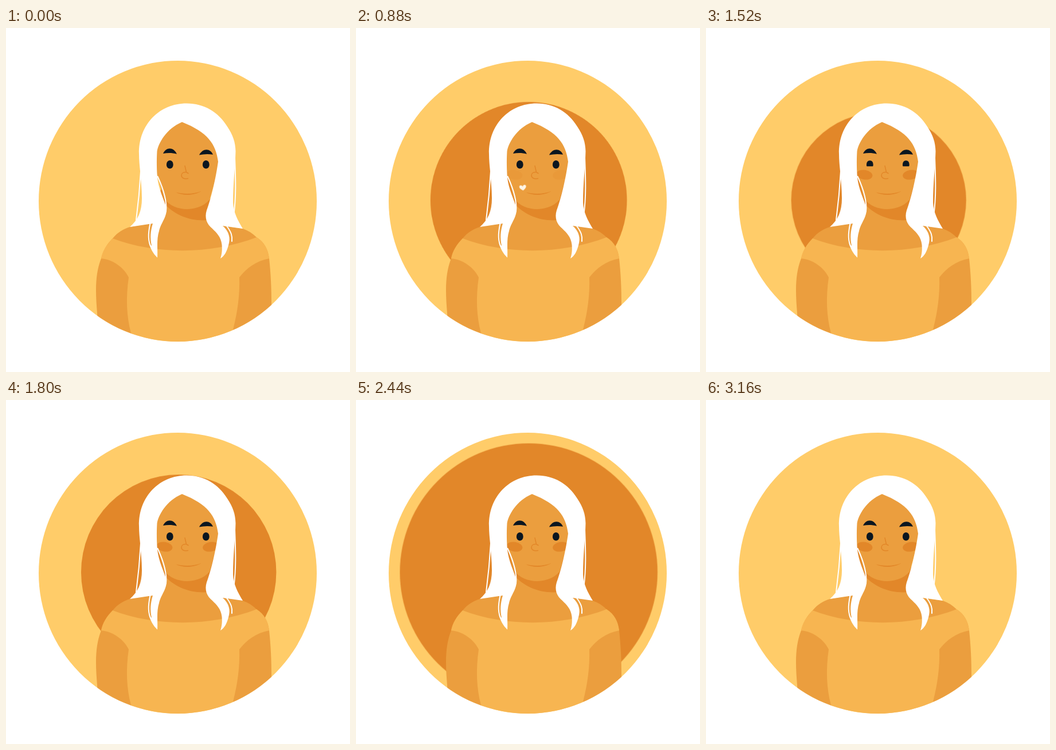
An HTML page that plays this animation: 600x600 px, repeating every 3.4 s.

```html
<!DOCTYPE html>
<html lang="en">
<head>
<meta charset="utf-8">
<title>Portrait with pulsing disc</title>
<style>
  html, body { margin: 0; width: 100%; height: 100%; overflow: hidden; background: #fff; }
  svg { display: block; width: 100vw; height: 100vh; }

  .skin { fill: #eb9e3e; }
  .shade { fill: #e28729; }
  .shirt { fill: #f7b551; }
  .ink { fill: #0b1620; }
  .hair { fill: #fff; }
  .strand { fill: none; stroke: #fff; stroke-width: 2; stroke-linecap: round; }
  .line { fill: none; stroke: #e28729; stroke-width: 1.5; stroke-linecap: round; stroke-linejoin: round; }

  .disc, .blush, .eye, .heart { animation: 3400ms linear infinite; }
  .disc { animation-name: pulse; animation-timing-function: cubic-bezier(.333, 0, .667, 1); }
  .blush { animation-name: blush; }
  .eye { animation-name: squint; }
  .heart { animation-name: kiss; }

  @keyframes pulse {
    0% { transform: scale(.18); }
    35.294% { transform: scale(1); }
    44.706% { transform: scale(.763); }
    70.588% { transform: scale(1.1285); }
    98.824%, 100% { transform: scale(.18); }
  }
  @keyframes blush {
    0%, 23.529% { opacity: 0; }
    35.294%, 100% { opacity: 1; }
  }
  @keyframes squint {
    0%, 42.353% { clip-path: inset(0 0 0 0); }
    44.706% { clip-path: inset(3% 0 28% 0); }
    45.882% { clip-path: inset(5% 0 42% 0); }
    49.412%, 100% { clip-path: inset(0 0 0 0); }
  }
  @keyframes kiss {
    0%, 3.529% { transform: translate(303px, 288px) scale(0); opacity: 1; }
    25.882% { transform: translate(291px, 278.5px) scale(1); opacity: .95; }
    32.353%, 100% { transform: translate(287px, 275px) scale(1); opacity: 0; }
  }
</style>
</head>
<body>
<svg viewBox="0 0 600 600">
  <defs>
    <clipPath id="frame"><ellipse cx="299.5" cy="302" rx="242.5" ry="245"/></clipPath>
  </defs>

  <ellipse cx="299.5" cy="302" rx="242.5" ry="245" fill="#ffcc69"/>

  <g clip-path="url(#frame)">
    <g transform="translate(301.2 300.3)"><circle class="disc shade" r="200"/></g>

    <!-- body -->
    <path class="skin" d="M162 560 L159 497 C156 460 155 430 166 402 C170 386 177 376 186 367 C195 356 204 351 216 347
      L255 340 L280 318 L350 318 L378 345 L413 350 C422 353 430 358 437 365 C451 374 457 386 459 402
      C462 430 463 455 463 480 L463 560 Z"/>
    <path class="shirt" d="M186 367 C175 378 168 390 166 402 C187 404 206 418 214 435 C209 470 210 502 218 532
      L222 560 L386 560 L396 526 C404 495 408 465 407 435 C419 419 437 406 459 402 C457 386 451 374 437 365
      C360 395 262 396 186 367 Z"/>
  </g>

  <!-- neck and face -->
  <path class="skin" d="M262 250 L276 300 L276 350 L358 350 L350 318 L374 233 C370 190 340 165 307 160 C275 170 258 200 260 235 Z"/>
  <path class="shade" d="M276 298 C295 323 342 322 359 294 L354 335 C321 338 294 326 276 306 Z"/>

  <g class="blush shade">
    <ellipse cx="276.5" cy="256" rx="14" ry="8.4" transform="rotate(9 276.5 256)"/>
    <ellipse cx="357" cy="256" rx="14" ry="8.4" transform="rotate(-9 357 256)"/>
  </g>

  <path class="ink" d="M274 219 C279 207.500 292 207 298 219.800 C290 217.500 282 217.500 274 219 Z"/>
  <path class="ink" d="M337 221.500 C343 209.500 356 209 361 220.800 C353 219.500 345 219.800 337 221.500 Z"/>
  <ellipse class="eye ink" cx="285.8" cy="238.200" rx="6" ry="7.300"/>
  <ellipse class="eye ink" cx="348.8" cy="238.200" rx="6" ry="7.300"/>

  <path class="line" d="M312 240.500 L314.500 251.500 L318 253.500 M314.500 251.500 C309 251 306 253.500 306 257 C306 261.500 311 264 317.500 262.500"/>
  <path class="shade" d="M296 286.500 C310 290 328 290 341 284.500 C328 292.500 309 293 296 286.500 Z"/>

  <!-- hair -->
  <path class="hair" d="M216 347 C230 335 237 320 237 297 C237 280 235 265 234 250 C233 240 232 230 232 220
    C231 168 268 131.500 315 131.500 C345 131.500 370 146 386 172 C396 187 400 199 400.500 215
    C400 240 396 270 396 305 C397 322 404 335 413 350
    L378 345 C389 355 392 366 388 379 C385 390 381 398 374 402 C377 393 377 386 376.500 378
    C375 364 367 357 360 350 C350 342 346 331 350 318 C358 297 366 262 370 233
    C366 202 352 182 307 164 C279 176 266 201 263.500 215 C262.500 232 263 248 264 261
    C266 280 275 298 280 314 C281 330 270 340 267 354 C262 370 265 386 264 400.500
    C256 393 252 384 249.500 376 L254 380 C251 365 252 355 256 341 Z"/>
  <path class="strand" d="M235 250 C233 285 230 312 227 335"/>
  <path class="strand" d="M399 225 C400 255 402 290 397.500 324"/>
  <path class="strand" d="M264.500 259 C276 284 281 303 279 320"/>
  <path class="strand" d="M251.500 341 C247 361 248 373 253 382"/>
  <path class="strand" d="M385 345.500 C393 356 395 363 394 372"/>

  <g class="heart">
    <path fill="#fffaf0" transform="rotate(-8)" d="M0 5 C-4 2 -6.500 0 -5.800 -2.700 C-5 -5.300 -1.200 -5 0 -2
      C1.200 -5 5 -5.300 5.800 -2.700 C6.500 0 4 2 0 5 Z"/>
  </g>
</svg>
</body>
</html>
```
